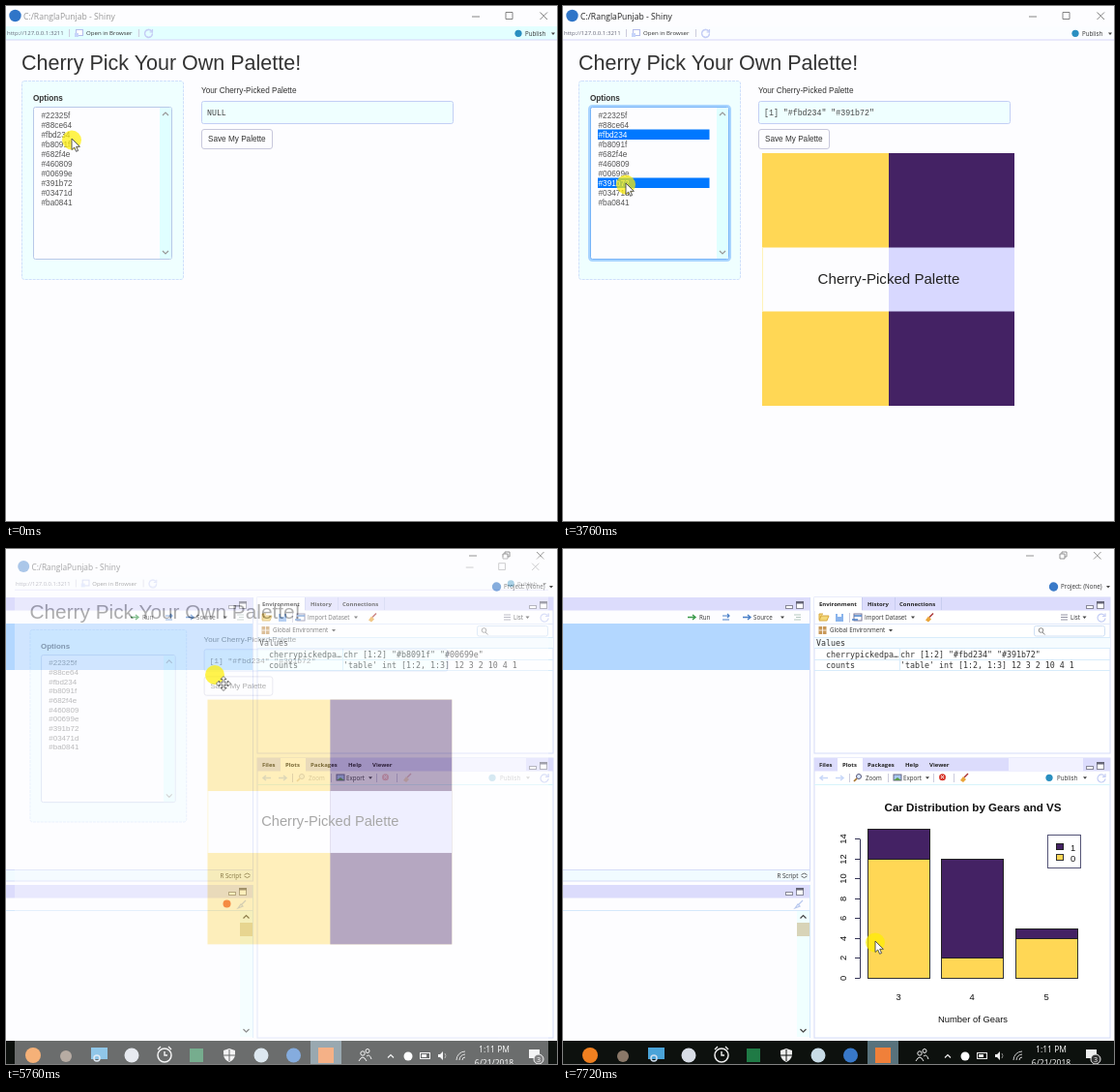
Recreate the animation shown at these times as an HTML page. Size 570x532 px, loop 7840 ms.

```html
<!DOCTYPE html>
<html lang="en">
<head>
<meta charset="utf-8">
<title>Cherry Pick Your Own Palette</title>
<style>
  html, body { margin: 0; width: 100%; height: 100%; overflow: hidden; background: #fdfdff; }
  svg { display: block; width: 570px; height: 532px; }
  text { white-space: pre; }
  .arial { font-family: "Liberation Sans", Arial, sans-serif; }
  .ui { font-family: "Open Sans", sans-serif; }
  .code { font-family: "Liberation Mono", monospace; }
  .mono { font-family: "DejaVu Sans Mono", monospace; }
  .bold { font-weight: bold; }
  .mid { text-anchor: middle; }
</style>
</head>
<body>
<svg id="stage" viewBox="0 0 570 532"></svg>
<script>
const LOOP = 7840;
const YELLOW = '#ffd755', PURPLE = '#442264', LILAC = '#dcdcfc', BLUE = '#0078ff';
const COLOURS = ['#22325f', '#88ce64', '#fbd234', '#b8091f', '#682f4e',
                 '#460809', '#00699e', '#391b72', '#03471d', '#ba0841'];

// Drawing helpers: each returns SVG markup.
const rect = (x, y, w, h, fill, extra = '') =>
  `<rect x="${x}" y="${y}" width="${w}" height="${h}" fill="${fill}" ${extra}/>`;
const text = (s, x, y, size, cls = 'ui', fill = '#333', extra = '') =>
  `<text x="${x}" y="${y}" font-size="${size}" class="${cls}" fill="${fill}" ${extra}>${s}</text>`;
const path = (d, stroke = '#555', width = 1, fill = 'none', extra = '') =>
  `<path d="${d}" stroke="${stroke}" stroke-width="${width}" fill="${fill}" ${extra}/>`;
const dot = (x, y, r, fill, extra = '') => `<circle cx="${x}" cy="${y}" r="${r}" fill="${fill}" ${extra}/>`;
const group = (id, ...parts) => `<g id="${id}">${parts.join('')}</g>`;
const line = (stroke, d) => path(d, stroke, 1);
const caret = (x, y, fill = '#444') => path(`M${x - 2} ${y - 1}h4l-2 2.5z`, 'none', 0, fill);
const chevron = (x, y, dir, stroke = '#999', w = 1.2) =>
  path(`M${x - 3} ${y + 1.5 * dir}l3 ${-3 * dir}l3 ${3 * dir}`, stroke, w);

const paneButtons = (y) =>
  rect(230.5, y + .5, 7, 3, '#fff', 'stroke="#889"') + rect(241.5, y - 3.5, 7, 7, '#fff', 'stroke="#889"') +
  rect(241, y - 4, 8, 2.5, '#667');
const broom = (x, y) =>
  path(`M${x + 4} ${y - 4}l-4 4`, '#a33', 1.4) + path(`M${x - 4} ${y + 3}l3 -4l3 3l-3 3z`, 'none', 0, '#eaa53a');
const refresh = (x, y) =>
  path(`M${x + 3} ${y - 2}a4 4 0 1 0 1 3M${x + 4} ${y - 4}v3h-3`, '#c4cdf4', 1.2);

function appWindow() {
  const rowY = i => 115.5 + 10 * i;
  const selected = (id, i) => group(id,
    rect(36, rowY(i) - 8, 115.5, 10.5, BLUE), text(COLOURS[i], 36.5, rowY(i), 8.25, 'arial', '#fff'));
  const swatch = (x, w, fill, band) =>
    rect(x, 152, w, 261, fill) + rect(x, 249.5, w, 66, band);

  return group('app',
    rect(0, 0, 570, 560, '#fdfdff'),
    dot(9.5, 10, 6.2, '#2f75c8'),
    text('C:/RanglaPunjab - Shiny', 18, 13.7, 8.6, 'ui', '#888', 'id="caption"'),
    path('M482 11h8M517 6.500h7v7h-7zM552.500 6.500l7.500 7.500m0 -7.500l-7.500 7.500', '#777', .9),
    rect(0, 21, 570, 14, '#e3ffff', 'id="toolbar"'),
    line('#d5d5f8', 'M0 35h570'),
    text('http://127.0.0.1:3211', 1, 30.2, 6.05, 'ui', '#667'),
    line('#ccd', 'M65.500 24v8M137.500 24v8'),
    rect(72.5, 24.5, 7, 6, '#fff', 'stroke="#b4bcec"'), rect(71, 28, 4, 4, '#c6d4fa'),
    text('Open in Browser', 83, 30.2, 6.1),
    dot(147.5, 28, 4, 'none', 'stroke="#ccd3fa"'), refresh(147.5, 28),
    dot(530, 28.3, 3.6, '#2a8fc0'), text('Publish', 537, 30.5, 6.2), caret(566, 28.5),

    text('Cherry Pick Your Own Palette!', 16, 66, 21.5, 'arial', '#333'),
    rect(16.5, 77.5, 167, 205, '#efffff', 'rx="2.500" stroke="#cfe0fb" stroke-dasharray="3 1"'),
    text('Options', 28, 97.5, 8.2, 'arial bold'),
    rect(27.5, 103.5, 145, 159, 'none', 'id="glow" rx="3" stroke="#a8d4ff" stroke-width="3"'),
    rect(28.5, 104.5, 143, 157, '#fdfdff', 'id="list" rx="2" stroke="#b8c8e8"'),
    rect(159, 105, 12, 156, '#e0ffff'),
    chevron(165, 111.5, 1), chevron(165, 254.5, -1),
    ...COLOURS.map((c, i) => text(c, 36.5, rowY(i), 8.25, 'arial', '#555')),
    selected('pick1', 2), selected('pick2', 7),

    text('Your Cherry-Picked Palette', 202, 90, 8.2, 'arial'),
    rect(202.5, 98.5, 260, 23, '#efffff', 'rx="2" stroke="#c3cff5"'),
    text('NULL', 208, 112.8, 8.25, 'code', '#444', 'id="result"'),
    rect(202.5, 127.5, 73, 20, '#fdfdff', 'id="button" rx="2.500" stroke="#c8c8dc"'),
    text('Save My Palette', 209, 140, 8.2, 'arial'),
    group('palette',
      swatch(206, 261, YELLOW, '#fdfdff'),
      line('#fff2b8', 'M206.500 249.500v66'),
      group('second', swatch(337, 130, PURPLE, '#d8d8ff')),
      text('Cherry-Picked Palette', 337, 287, 15.1, 'arial mid', '#222')));
}

function barChart() {
  const yAt = v => Math.round(443 - 10.27 * v) + .5;
  const bar = (x, low, total, label) =>
    rect(x, yAt(low), 64, yAt(0) - yAt(low), YELLOW, 'stroke="#333"') +
    rect(x, yAt(total), 64, yAt(low) - yAt(total), PURPLE, 'stroke="#222"') +
    text(label, x + 31.5, 466, 9.4, 'arial mid', '#111');
  const ticks = [0, 2, 4, 6, 8, 10, 12, 14].map(v =>
    path(`M302 ${yAt(v)}h5`, '#335') +
    text(v, 0, 0, 9.4, 'arial mid', '#111', `transform="translate(293 ${yAt(v)}) rotate(-90)"`));
  return group('chart',
    text('Car Distribution by Gears and VS', 424, 270.5, 11.6, 'arial bold mid', '#111'),
    path(`M307.500 ${yAt(0)}V${yAt(14)}`, '#335'), ...ticks,
    bar(315.5, 12, 15, 3), bar(391.5, 2, 12, 4), bar(468.5, 4, 5, 5),
    text('Number of Gears', 424, 489, 9.4, 'arial mid', '#111'),
    rect(501.5, 295.5, 34, 34, '#fff', 'stroke="#557"'),
    rect(510.5, 304.5, 7, 6, PURPLE, 'stroke="#222"'), text('1', 525, 311.5, 9.4, 'arial', '#111'),
    rect(510.5, 315.5, 7, 6, YELLOW, 'stroke="#333"'), text('0', 525, 323, 9.4, 'arial', '#111'));
}

function taskbar() {
  const light = '#eee', dark = '#0d110e';
  return rect(0, 508, 570, 24, dark) + rect(315, 508, 32, 24, '#58727c') +
    dot(28, 523, 8, '#f08020') + dot(62, 524, 6, '#8a7868') +
    rect(88, 515, 17, 12, '#4aa3d8') + dot(94, 526, 3, 'none', 'stroke="#cde" stroke-width="1.500"') +
    dot(130, 523, 7.5, '#d8dde6') +
    dot(164, 523, 7, 'none', `stroke="${light}" stroke-width="1.500"`) +
    path('M164 519v4h3M157 517l3 -3M171 517l-3 -3', light, 1.4) +
    rect(190, 516, 14, 14, '#1f7a45') +
    path('M231 516l6 2v5q-1 5 -6 7q-5 -2 -6 -7v-5z', 'none', 0, light) +
    path('M231 517v12M225 523h12', dark, 1) +
    dot(264, 523, 7.5, '#c8dbe6') + dot(297.5, 523, 7.5, '#3878c8') + rect(323, 515, 16, 16, '#f0803a') +
    dot(369, 521, 2.2, 'none', `stroke="${light}"`) + dot(374, 518.5, 2, 'none', `stroke="${light}"`) +
    path('M365 529q4 -8 8 0M373 524q3 -3 5 3', light) +
    chevron(398, 524, 1, light) + dot(416, 524, 4.5, '#fff') +
    rect(428.5, 520.5, 10, 6, 'none', `stroke="${light}"`) + rect(430, 522, 5, 3, light) +
    path('M447 522h2l3 -3v9l-3 -3h-2z', 'none', 0, light) + path('M454 521q2 2.500 0 5', '#888') +
    path('M466 528a9 9 0 0 1 9 -9M469 528a6 6 0 0 1 6 -6M472 528a3 3 0 0 1 3 -3', '#ccc') +
    text('1:11 PM', 505, 520.3, 8.5, 'ui mid', '#fff') + text('6/21/2018', 505, 534, 8.5, 'ui mid', '#fff') +
    rect(541, 517, 11, 9, light) + dot(551, 527, 5, '#333', `stroke="${light}"`) +
    text('3', 551, 529.7, 7, 'ui mid', '#fff');
}

function desktop() {
  const tab = (s, x, y) => text(s, x, y, 6, 'ui bold', '#222');
  const label = (s, x, y) => text(s, x, y, 6.2);
  const rightButtons = y => `<g transform="translate(311)">${paneButtons(y)}</g>`;
  return group('desktop',
    rect(0, 0, 570, 532, '#fdfdff'),
    path('M479 7h8M514 5h5v5h-5zM516 5v-2h5v5h-2M549 3l7.500 7.500m0 -7.500l-7.500 7.500', '#888', .9),
    dot(507.5, 39, 4.7, '#3a7ac8'), label('Project: (None)', 515, 41.3), caret(564, 39),

    // source editor
    rect(0, 50, 256, 13.5, LILAC), paneButtons(58),
    path('M129 70.500h8m-3 -2.500l3 2.500l-3 2.500', '#3a9a4a', 1.4), label('Run', 141, 73),
    path('M165 69h7m-2 -2l2 2l-2 2M172 73h-7', '#4a80c8', 1.2),
    path('M186 70.500h8m-3 -2.500l3 2.500l-3 2.500', '#4a80c8', 1.4), label('Source', 197, 73), caret(227, 70.5),
    path('M239 68h7M241 70.500h5M239 73h7', '#b5c8c0'),
    rect(0, 77, 256, 48, '#b3d7ff'),
    rect(0, 331.5, 256, 11.5, '#f1fbff'), line('#d5dcf8', 'M0 331.500h256M0 343h256M255.500 50v293'),
    text('R Script', 221.5, 339.7, 6.2), chevron(249.5, 335.8, .5, '#444', .8), chevron(249.5, 338.8, -.5, '#444', .8),

    // console
    rect(0, 347, 256, 13.5, LILAC), paneButtons(354), line('#d5e8fb', 'M0 373.500h256M255.500 347v158'),
    path('M248 363l-4 4m-4 4l3 -4l2 2z', '#b8c8ee', 1.2),
    dot(228.5, 366.5, 4, '#f05a38', 'id="running"'),
    rect(242, 374, 13, 130, '#f0ffff'), rect(242, 386, 13, 14, '#d8d4b8'),
    chevron(248.5, 380, 1, '#444'), chevron(248.5, 497.5, -1, '#444'),

    // environment
    rect(260, 50, 306, 161, '#fff', 'stroke="#d5dcf8"'),
    rect(260, 50, 306, 13.5, LILAC), rect(260, 50, 49, 14, '#fff'),
    line('#c8cdf0', 'M309.500 50v13M343.500 50v13M391.500 50v13'),
    tab('Environment', 265, 59.3), tab('History', 315, 59.3), tab('Connections', 348, 59.3), rightButtons(58),
    path('M265 74l2 -5h8l-2 5zM265 73v-6h4', '#d8a840', 1, '#f4d878'),
    rect(282, 67, 8, 8, '#8ab4ec'), rect(284, 67, 4, 3, '#fff'), line('#ccd', 'M296.500 66v10'),
    rect(301, 67, 8, 7, '#fff', 'stroke="#779"'), path('M301 69h8M299 73h6', '#4a80c8', 1.4),
    label('Import Dataset', 312, 73), caret(362, 70.5), broom(379, 70.5),
    path('M515 68h7M515 70.500h7M515 73h7', '#889', .9), label('List', 525, 73), caret(539.5, 70.5), refresh(557, 70.5),
    line('#e0e8fa', 'M260 77.500h306'),
    rect(264.5, 80, 8, 8, '#c89858'), path('M264.500 84h8M268.500 80v8', '#fff', .8),
    label('Global Environment', 276, 86.3), caret(339, 84),
    rect(487.5, 79.5, 73, 10.5, '#fff', 'rx="2" stroke="#d0e0f4"'),
    dot(494.5, 84, 2.3, 'none', 'stroke="#888"'), path('M496 86l2.500 2.500', '#888'),
    rect(260, 91.5, 306, 11, '#f6fcff'),
    line('#d8ecfb', 'M260 91.500h306M260 102.500h306M260 114.500h306M260 125.500h306M348.500 103v22'),
    text('Values', 262, 100, 8.3, 'mono'),
    text('cherrypickedpa…', 272, 111.6, 8.3, 'mono'), text('', 349, 111.6, 8.3, 'mono', '#333', 'id="value"'),
    text('counts', 272, 122.5, 8.3, 'mono'),
    text("'table' int [1:2, 1:3] 12 3 2 10 4 1", 349, 122.5, 8.3, 'mono'),

    // plots
    rect(260, 216, 306, 289, '#fff', 'stroke="#d5dcf8"'),
    rect(260, 216, 306, 13.5, LILAC), rect(284, 216, 26, 14, '#fff'), rect(461, 216, 77, 13.5, '#f2f2ff'),
    ...[['Files', 265], ['Plots', 289], ['Packages', 315], ['Help', 354], ['Viewer', 379]].map(([s, x]) => tab(s, x, 225)),
    rightButtons(224),
    path('M274 236.500h-8m3 -2.500l-3 2.500l3 2.500M282 236.500h8m-3 -2.500l3 2.500l-3 2.500', '#c8d8f8', 1.5),
    line('#ccd', 'M296.500 232v9M336.500 232v9M383.500 232v9M404.500 232v9'),
    rect(342, 233, 8, 6, '#a8c8f0', 'stroke="#668"'), path('M342 239l4 -3l4 3z', 'none', 0, '#5a9a48'),
    label('Export', 352, 238.8), caret(377, 236.3),
    line('#d8f4fb', 'M260 243.500h306'),
    group('plotTools',
      dot(306, 235, 2.5, '#dceaff', 'stroke="#557"'), path('M304 237l-3 3', '#a67530', 1.7), label('Zoom', 313, 238.8),
      dot(392.5, 235.7, 3.5, '#d83a30'), path('M391 234l3 3m0 -3l-3 3', '#fff'), broom(415, 236),
      dot(503, 236.3, 3.6, '#2a8fc0'), label('Publish', 511, 238.8), caret(540, 236.3)),
    refresh(557, 236.3),
    barChart(), taskbar());
}

function pointer() {
  return dot(0, 0, 10, '#ffee00', 'id="halo" opacity=".7"') + group('cursor',
    path('M0 0v11.500l2.700 -2.500l1.900 4.300l2 -.9l-1.900 -4.100h3.700z', '#444', .9, '#fff', 'id="arrow"'),
    path('M-1.500 1q1.500 -2 3 0v5l5 1.200q1.500 .5 1.200 2.500l-1 4.300h-6.500l-4 -5.500q0 -2 2.300 -.5z', '#333', .9, '#fff', 'id="hand"'),
    path('M0 -7.500l3 3h-2v3.500h3.500v-2l3 3l-3 3v-2h-3.500v3.500h2l-3 3l-3 -3h2v-3.500h-3.500v2l-3 -3l3 -3v2h3.500v-3.500h-2z', '#555', .8, '#fff', 'id="move"'));
}

document.getElementById('stage').innerHTML = desktop() + appWindow() + pointer();
const el = id => document.getElementById(id);
const show = (id, on) => el(id).setAttribute('visibility', on ? 'visible' : 'hidden');
const set = (id, name, value) => el(id).setAttribute(name, value);

// Pointer stops: time, x, y.
const TRACK = [[0, 68, 137], [40, 68, 137], [120, 66, 133], [320, 66, 132], [2320, 66, 132], [2680, 64, 174],
  [2880, 64, 181], [3040, 64, 181], [3120, 65, 183], [4320, 65, 183], [4760, 219, 139], [5600, 219, 139],
  [5720, 225, 139], [5920, 225, 139], [6440, 291, 348], [7040, 291, 348], [7280, 323, 402],
  [7600, 323, 402], [7720, 323, 405], [LOOP, 323, 405]];
const HALO_OFFSET = { arrow: [0, 1.5], hand: [-5, 1], move: [-9, -9] };
const clamp = v => Math.max(0, Math.min(1, v));

function pointerAt(t) {
  const i = TRACK.findIndex(stop => stop[0] > t);
  const [t0, x0, y0] = TRACK[i - 1], [t1, x1, y1] = TRACK[i];
  const p = (t - t0) / (t1 - t0), e = p * p * (3 - 2 * p);
  return [x0 + (x1 - x0) * e, y0 + (y1 - y0) * e];
}

function draw(t) {
  const active = t >= 640, first = t >= 1700, second = t >= 3700;
  const focused = active && t < 5640;
  const closing = clamp((t - 5664) / 160), saved = t >= 5920;

  set('caption', 'fill', active ? '#222' : '#999');
  set('toolbar', 'fill', active ? '#fbfdff' : '#e3ffff');
  show('glow', focused);
  set('list', 'stroke', focused ? '#78b4f8' : '#b8c8e8');
  show('pick1', focused);
  show('pick2', focused && t >= 3400);
  el('result').textContent = second ? '[1] "#fbd234" "#391b72"' : first ? '[1] "#fbd234"' : 'NULL';
  el('palette').style.display = first ? '' : 'none';
  el('second').style.display = second ? '' : 'none';

  el('app').style.display = closing < 1 ? '' : 'none';
  set('app', 'opacity', 1 - closing);
  set('app', 'transform', `translate(285 266) scale(${1 - .052 * closing}) translate(-285 -266)`);

  el('value').textContent = 'chr [1:2] ' + (saved ? '"#fbd234" "#391b72"' : '"#b8091f" "#00699e"');
  show('running', !saved);
  show('chart', t >= 6040);
  set('plotTools', 'opacity', t >= 6040 ? 1 : .3);

  const [x, y] = pointerAt(t);
  const kind = t >= 5680 && t < 5960 ? 'move' : t >= 4680 && t < 5680 ? 'hand' : 'arrow';
  set('button', 'fill', kind === 'hand' ? '#dedefa' : '#fdfdff');
  for (const k in HALO_OFFSET) show(k, k === kind);
  const [dx, dy] = HALO_OFFSET[kind];
  set('halo', 'transform', `translate(${x + dx} ${y + dy})`);
  set('cursor', 'transform', `translate(${x} ${y})`);
}

function frame() {
  draw(performance.now() % LOOP);
  requestAnimationFrame(frame);
}
frame();
</script>
</body>
</html>
```
